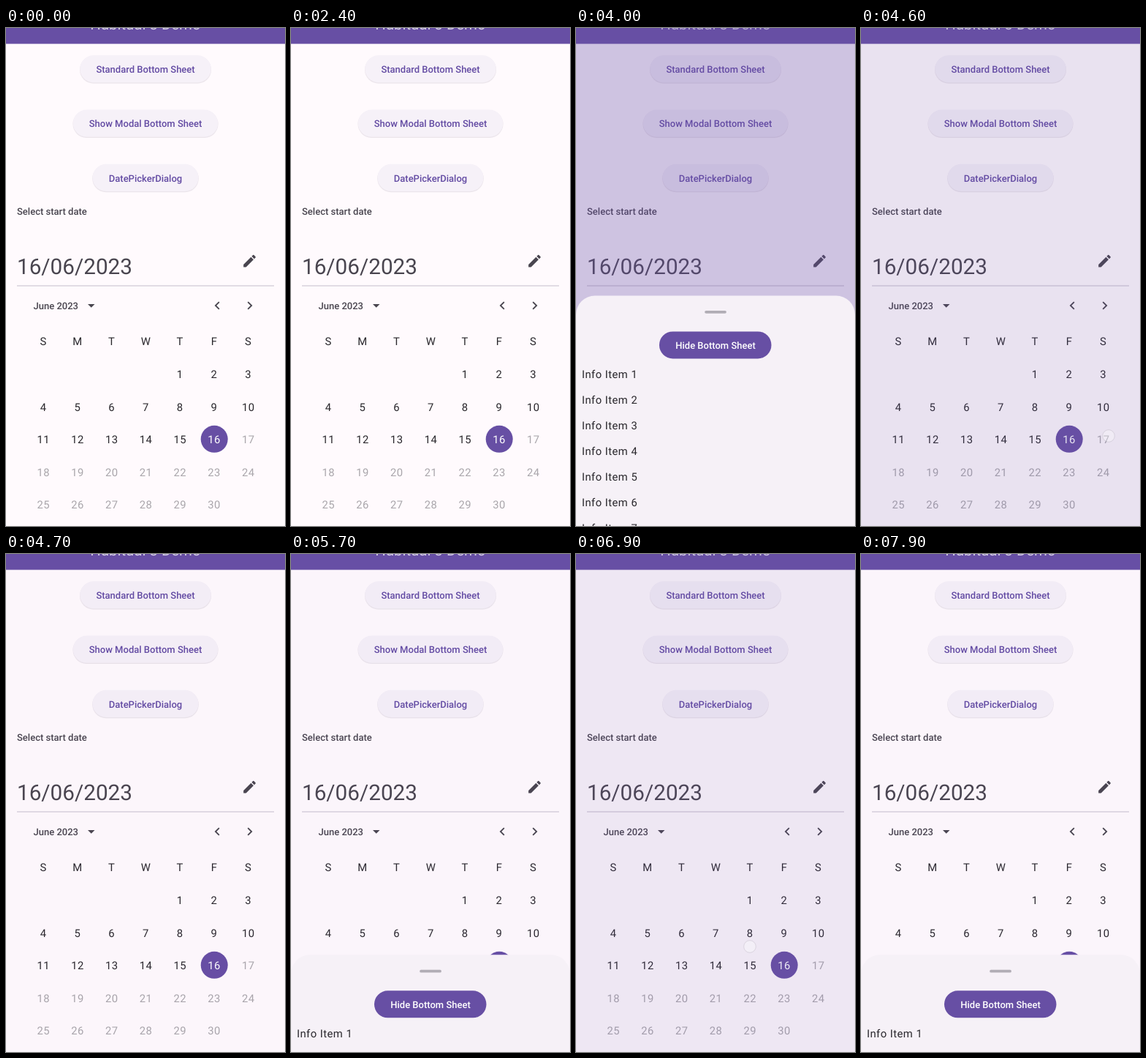
These frames come from a looping animation (382x680 px, 8000 ms). An HTML page:

```html
<!DOCTYPE html>
<html lang="en">
<head>
<meta charset="utf-8">
<style>
  html, body { margin: 0; width: 100%; height: 100%; overflow: hidden; background: #fffafd; }
  svg { display: block; width: 382px; height: 680px; font-family: Roboto, sans-serif; text-rendering: geometricPrecision; }
  .label { font-size: 13px; font-weight: 500; }
  .body { font-size: 14.8px; letter-spacing: .46px; fill: #29272c; }
  .mid { text-anchor: middle; }
  .muted { fill: #49454f; }
</style>
</head>
<body>
<svg viewBox="0 0 382 680">
  <rect width="382" height="680" fill="#fffafd"/>
  <rect width="382" height="21.6" fill="#674fa4"/>
  <text class="mid" x="191" y="1.5" font-size="20.4" fill="#fff" opacity=".75">Habitual 3 Demo</text>
  <g id="buttons"></g>
  <g class="muted">
    <text class="label" x="15" y="255">Select start date</text>
    <text x="15" y="335.5" font-size="29.7">16/06/2023</text>
    <path transform="translate(322.4 307) scale(.927)" d="M3 17.25V21h3.75L17.81 9.94l-3.75-3.75zM20.71 7.04c.39-.39.39-1.02 0-1.41l-2.34-2.34a1 1 0 0 0-1.41 0l-1.83 1.83 3.75 3.75z"/>
    <text class="label" x="37.5" y="384">June 2023</text>
    <path d="M112 377h9.5l-4.75 4.7z"/>
    <path transform="translate(278.2 367.9) scale(.927)" d="M15.41 7.41 14 6l-6 6 6 6 1.41-1.41L10.83 12z"/>
    <path transform="translate(322.6 367.9) scale(.927)" d="M10 6 8.59 7.41 13.17 12l-4.58 4.59L10 18l6-6z"/>
  </g>
  <rect x="15" y="351.5" width="352" height="1" fill="#c6c0cb"/>
  <circle cx="285.2" cy="561.3" r="18.5" fill="#674fa4"/>
  <g id="calendar" class="body mid"></g>
  <rect id="scrim" width="382" height="680" fill="#674fa4"/>
  <g id="sheet">
    <rect width="382" height="700" rx="26" fill="#f6f1f7"/>
    <rect x="176.2" y="20.5" width="29.7" height="3.8" rx="1.9" fill="#b1adb5"/>
    <rect x="114" y="49" width="153.5" height="37" rx="18.5" fill="#674fa4"/>
    <text class="label mid" x="191" y="73" fill="#fff">Hide Bottom Sheet</text>
    <g id="items" class="body"></g>
  </g>
  <circle id="touch" r="8.3" fill="#fff" fill-opacity=".32" stroke="#6b6570" stroke-opacity=".16"/>
</svg>
<script>
const $ = id => document.getElementById(id);
const text = (x, y, s, attrs = '') => `<text x="${x}" y="${y}" ${attrs}>${s}</text>`;

const button = (x, y, w, s) => `
  <rect x="${x - .3}" y="${y + .9}" width="${w + .6}" height="37.5" rx="18.7" fill="#3a2c50" opacity=".1"/>
  <rect x="${x}" y="${y}" width="${w}" height="37.2" rx="18.6" fill="#f6f1f8"/>
  ${text(x + w / 2, y + 23.7, s, 'class="label mid" fill="#634ba3"')}`;
$('buttons').innerHTML =
  button(101.3, 37.3, 179.4, 'Standard Bottom Sheet') +
  button(91.8, 111.5, 198.4, 'Show Modal Bottom Sheet') +
  button(118.5, 185.8, 145, 'DatePickerDialog');

const colX = i => 51.2 + 46.75 * i;
let cells = [...'SMTWTFS'].map((s, i) => text(colX(i), 433, s)).join('');
for (let day = 1; day <= 30; day++) {
  const i = day + 3;
  const fill = day === 16 ? '#fff' : day > 16 ? '#a9a6ab' : '#29272c';
  cells += text(colX(i % 7), 478 + 44.55 * Math.floor(i / 7), day, `fill="${fill}"`);
}
$('calendar').innerHTML = cells;

$('items').innerHTML = Array.from({ length: 10 }, (_, i) =>
  text(8, 113 + 35 * i, 'Info Item ' + (i + 1))).join('');

// Standard curve: cubic-bezier(.4, 0, .2, 1)
function ease(x) {
  if (x <= 0) return 0;
  if (x >= 1) return 1;
  let lo = 0, hi = 1, s;
  for (let i = 0; i < 24; i++) {
    s = (lo + hi) / 2;
    const v = 1 - s;
    if (1.2 * v * v * s + .6 * v * s * s + s * s * s < x) lo = s; else hi = s;
  }
  return s * s * (3 - 2 * s);
}

const LOOP = 8000, MOVE = 300, HIDDEN = 789.4, OPEN = 365.4, SCRIM = .32;
const visits = [
  { show: 2959, dim: 3008, hide: 4430, clear: 4489, drag: { end: 4600, from: [343, 537], to: [339, 557] } },
  { show: 5587, dim: 5651, hide: 6730, clear: 6777, drag: { end: 6900, from: [240, 514], to: [238, 536] } },
  { show: 7787, dim: 7851, hide: 1e5, clear: 1e5 }
];
const pulse = (t, on, off) => ease((t - on) / MOVE) - ease((t - off) / MOVE);

function draw(t) {
  let open = 0, dim = 0, touch = null;
  for (const v of visits) {
    open += pulse(t, v.show, v.hide);
    dim += pulse(t, v.dim, v.clear);
    if (v.drag && t > v.drag.end - 220 && t < v.drag.end + 60) touch = v.drag;
  }
  $('sheet').setAttribute('transform', `translate(0 ${HIDDEN + (OPEN - HIDDEN) * open})`);
  $('scrim').setAttribute('opacity', SCRIM * dim);
  $('touch').setAttribute('visibility', touch ? 'visible' : 'hidden');
  if (touch) {
    const p = Math.min(1, Math.max(0, (t - touch.end + 200) / 200));
    const [x, y] = touch.from.map((a, i) => a + (touch.to[i] - a) * p);
    $('touch').setAttribute('transform', `translate(${x} ${y})`);
  }
}

const start = performance.now();
function tick() {
  draw((performance.now() - start) % LOOP);
  requestAnimationFrame(tick);
}
tick();
</script>
</body>
</html>
```
